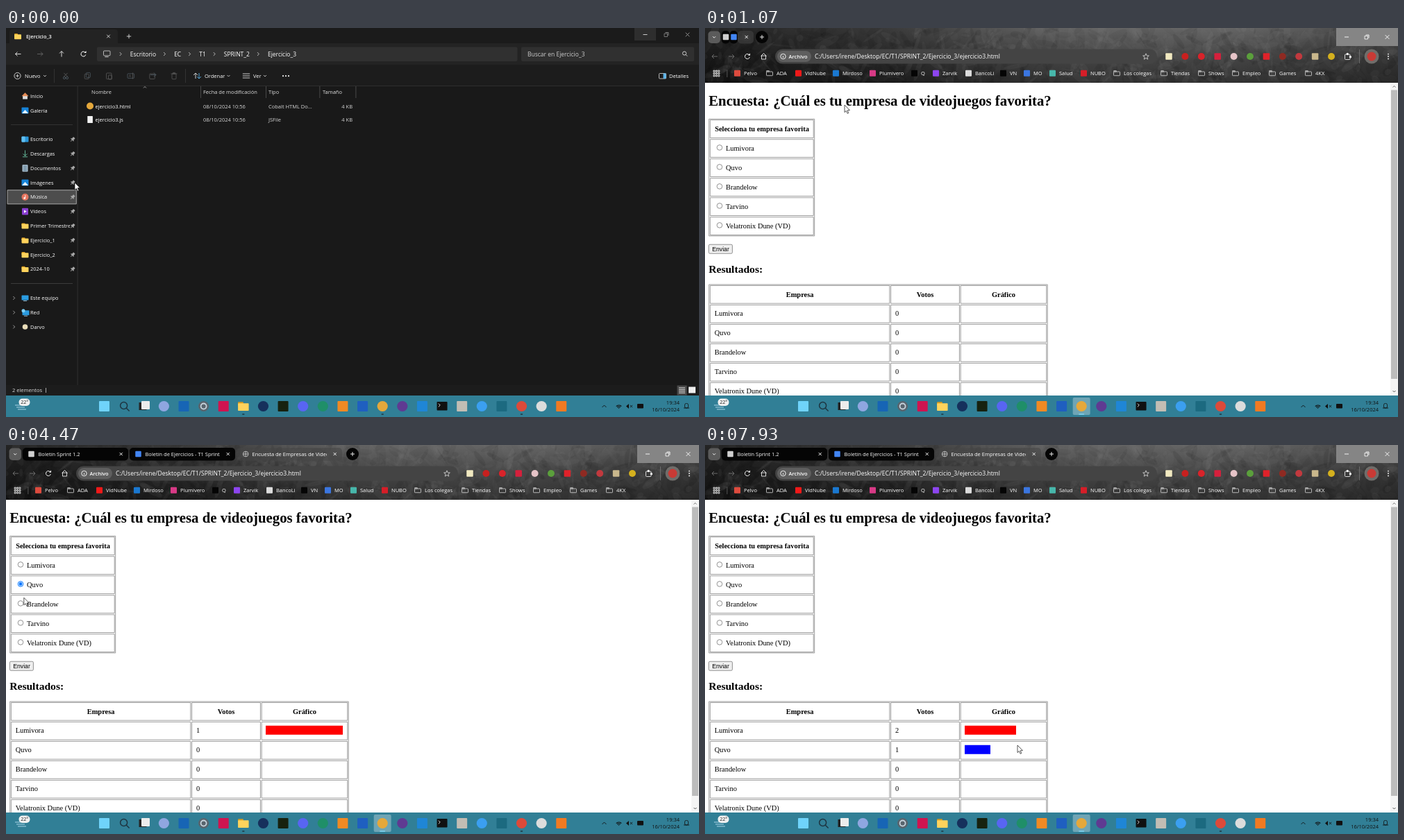
An HTML page with a canvas that plays this animation: 998 px wide and 561 px high, repeating every 8000 ms.

```html
<!DOCTYPE html>
<html lang="es">
<head>
<meta charset="utf-8">
<title>Encuesta</title>
<style>
html, body { margin: 0; width: 100%; height: 100%; overflow: hidden; background: #191919; }
canvas { display: block; width: 100vw; height: 100vh; }
</style>
</head>
<body>
<canvas id="stage"></canvas>
<script>
const W = 998, H = 561, LOOP = 8000, STEP = 1000 / 15;
const SANS = '"Open Sans", "Noto Sans", sans-serif';
const SERIF = '"Liberation Serif", serif';
const ARIAL = '"Liberation Sans", sans-serif';
const canvas = document.getElementById('stage');
const ratio = Math.max(1, window.devicePixelRatio || 1);
canvas.width = W * ratio;
canvas.height = H * ratio;
let g = canvas.getContext('2d');

const clamp = v => Math.min(1, Math.max(0, v));
const smooth = p => p * p * (3 - 2 * p);
const easeOut = p => 1 - (1 - p) ** 2;
const mix = (a, b, p) => a + (b - a) * p;

// Drawing helpers
function box(x, y, w, h, fill, r = 0) {
  g.fillStyle = fill;
  g.beginPath();
  g.roundRect(x, y, w, h, r);
  g.fill();
}
function frame(x, y, w, h, color, r = 0, lw = 0.8) {
  g.strokeStyle = color;
  g.lineWidth = lw;
  g.beginPath();
  g.roundRect(x, y, w, h, r);
  g.stroke();
}
function dot(x, y, r, fill) {
  g.fillStyle = fill;
  g.beginPath();
  g.arc(x, y, r, 0, 7);
  g.fill();
}
function ring(x, y, r, color, lw = 0.9, from = 0, to = 7) {
  g.strokeStyle = color;
  g.lineWidth = lw;
  g.beginPath();
  g.arc(x, y, r, from, to);
  g.stroke();
}
function trace(x, y, pts) {
  g.beginPath();
  for (let i = 0; i < pts.length; i += 2) g.lineTo(x + pts[i], y + pts[i + 1]);
}
function path(x, y, pts, color, lw = 0.9) {
  g.strokeStyle = color;
  g.lineWidth = lw;
  trace(x, y, pts);
  g.stroke();
}
function poly(x, y, pts, fill) {
  g.fillStyle = fill;
  trace(x, y, pts);
  g.fill();
}
// y is the vertical middle of the capitals
function text(s, x, y, size = 7.5, color = '#fff', align = 'left', font = SANS, weight = 400) {
  g.font = `${weight} ${size}px ${font}`;
  g.fillStyle = color;
  g.textAlign = align;
  g.fillText(s, x, y + size * 0.36);
}
function clipped(x, y, w, h, draw) {
  g.save();
  g.beginPath();
  g.rect(x, y, w, h);
  g.clip();
  draw();
  g.restore();
}
const square = (x, y, s, fill) => box(x - s / 2, y - s / 2, s, s, fill, 1);
const hline = (x, y, s, c) => path(x, y, [-s, 0, s, 0], c);
const vline = (x, y, s, c) => path(x, y, [0, -s, 0, s], c);
const plus = (x, y, s, c) => { hline(x, y, s, c); vline(x, y, s, c); };
const cross = (x, y, s, c) => {
  path(x, y, [-s, -s, s, s], c);
  path(x, y, [-s, s, s, -s], c);
};
const chevron = (x, y, c = '#ccc', s = 1) => path(x, y, [-2 * s, -s, 0, s, 2 * s, -s], c);
const chevronRight = (x, y, c = '#ccc') => path(x, y, [-1.2, -2.4, 1.2, 0, -1.2, 2.4], c);
function arrow(x, y, turn, c) {
  g.save();
  g.translate(x, y);
  g.rotate(turn * Math.PI / 2);
  hline(0, 0, 4, c);
  path(4, 0, [-3, -3, 0, 0, -3, 3], c);
  g.restore();
}
function reload(x, y) {
  ring(x, y, 3.4, '#fff', 1, 0.3, 5.7);
  poly(x + 4, y - 1.4, [-3, 0, 0, 0, 0, -3], '#fff');
}
function magnifier(x, y, r, c, lw = 0.9) {
  ring(x, y, r, c, lw);
  path(x + r * 0.7, y + r * 0.7, [0, 0, r * 0.9, r * 0.9], c, lw);
}
function restore(x, y, c) {
  frame(x - 3, y - 1.5, 4.5, 4.5, c);
  path(x, y, [-1.5, -3, 3, -3, 3, 1.5], c);
}
function folder(x, y, s = 1) {
  box(x - 5 * s, y - 4 * s, 5 * s, 4 * s, '#d99a1c', 0.8);
  box(x - 5 * s, y - 2.8 * s, 10 * s, 7 * s, '#ffd35c', 0.8);
}
function folderLine(x, y) {
  frame(x - 4.5, y - 2, 9, 5.7, '#d5d5d5', 0.8);
  frame(x - 4.5, y - 3.4, 4, 1.4, '#d5d5d5', 0.4);
}
function pin(x, y) {
  g.save();
  g.translate(x, y);
  g.rotate(0.78);
  box(-1.7, -3.4, 3.4, 4, '#a8a8a8', 0.5);
  box(-2.8, 0, 5.6, 1.3, '#a8a8a8');
  box(-0.4, 1, 0.8, 3, '#a8a8a8');
  g.restore();
}
function screen(x, y) {
  box(x - 5, y - 4, 10, 7, '#2a9be0', 0.7);
  box(x - 2.5, y + 3.6, 5, 0.9, '#a8c9dd');
}

// Sidebar glyphs
const glyphs = {
  folder, screen,
  home(x, y) {
    box(x - 3.4, y - 1, 6.8, 5.4, '#dcdcdc');
    poly(x, y, [-5, 0, 0, -5, 5, 0], '#e58b55');
  },
  picture(x, y) {
    box(x - 5, y - 4.5, 10, 9, '#1683d8', 1);
    poly(x, y + 4, [-4.5, 0, 0, -5, 4.5, 0], '#e4f3ff');
  },
  desk(x, y) { box(x - 5, y - 4, 10, 8, '#2994d6', 1); box(x - 5, y - 4, 5, 8, '#62bff0', 1); },
  down(x, y) { arrow(x, y - 1, 1, '#6ac6a4'); hline(x, y + 4.4, 3.6, '#6ac6a4'); },
  doc(x, y) {
    box(x - 4, y - 5, 8, 10, '#a9bfd0', 0.8);
    for (let i = 0; i < 4; i++) box(x - 2.5, y - 3 + i * 2, 5, 0.8, '#48697f');
  },
  music(x, y) { dot(x, y, 5, '#e6755f'); dot(x - 0.8, y + 1.6, 1.3, '#fff'); vline(x + 0.3, y - 0.6, 2.2, '#fff'); },
  video(x, y) { box(x - 4.5, y - 4.8, 9, 9.6, '#8a3fd1', 1); poly(x, y, [-1.5, -2.2, 2.2, 0, -1.5, 2.2], '#fff'); },
  net(x, y) { screen(x + 1, y + 1); dot(x - 2.5, y - 2.5, 2.5, '#7fd0f5'); },
  plain(x, y) { dot(x, y, 3.8, '#e8dcb8'); }
};
const sidebar = [
  'home Inicio', 'picture Galería', '',
  'desk Escritorio', 'down Descargas', 'doc Documentos', 'picture Imágenes', 'music Música', 'video Vídeos',
  'folder Primer Trimestre', 'folder Ejercicio_1', 'folder Ejercicio_2', 'folder 2024-10', '',
  'screen Este equipo', 'net Red', 'plain Darvo'
];

// Timeline
const PICK = 300, LIT = 730, LAUNCH = 870, OPEN = 1050;
const FILE = [201, 111], FIRST = [20, 172], SECOND = [19, 199], SEND = [33, 318];
// start, end and goal of each hand movement
const moves = [
  [60, 300, FILE], [1150, 1540, FIRST], [2050, 2470, SEND], [2850, 3270, [400, 403]], [3620, 4130, SECOND],
  [4270, 4670, SEND], [4960, 5460, [438, 444]], [5760, 6200, FIRST], [6700, 7130, SEND], [7530, 7930, [450, 433]]
];
// option chosen and moment of sending for each round
const rounds = [
  { option: 0, pick: 1850, send: 2700 },
  { option: 1, pick: 4240, send: 4930 },
  { option: 0, pick: 6450, send: 7350 }
];

function cursorAt(t) {
  let at = [99, 223];
  for (const [from, to, goal] of moves) {
    const s = smooth(clamp((t - from) / (to - from)));
    at = [mix(at[0], goal[0], s), mix(at[1], goal[1], s ** 2.4)];
  }
  return at;
}

function commandIcons(on) {
  const a = on ? '#e4e4e4' : '#5a5a5a', b = on ? '#5cb3e8' : '#4f5a62', off = '#5a5a5a';
  cross(86, 67.5, 2.6, a);
  ring(84, 72, 1.6, b);
  ring(88, 72, 1.6, b);
  frame(113.2, 66.4, 6, 7, a, 1);
  frame(115.4, 64.4, 6, 7, b, 1);
  frame(144.5, 65, 7.5, 8.6, off, 1);
  frame(147.5, 68, 5, 6, off, 1);
  frame(175, 65.8, 9.6, 6.6, b, 1);
  text('A', 176.8, 69, 5.5, a);
  vline(182.6, 69, 4.5, a);
  frame(206.8, 66, 7.5, 7.5, a, 1);
  arrow(212, 67.5, 0, b);
  hline(242, 66, 4.4, a);
  frame(239, 66, 6, 7.7, a, 1);
  frame(240.5, 64.4, 3, 1.6, a);
}

function explorer(t) {
  const picked = t >= PICK;
  box(0, 0, W, 530, '#191919');
  box(0, 0, W, 23, '#1b1b1b');
  box(5, 2, 156, 24, '#232323', 4);
  box(0, 22, W, 31.5, '#232323');
  folder(17, 12);
  text('Ejercicio_3', 29, 12, 7.4, '#fff', 'left', SANS, 600);
  cross(147.5, 12, 2.3, '#ddd');
  plus(177, 12, 3.2, '#ddd');
  box(905, 0, 31, 18, '#2e2e2e');
  hline(920.5, 9.5, 3, '#ddd');
  restore(951, 9.5, '#8c8c8c');
  cross(981.5, 9.5, 2.8, '#999');

  arrow(17.5, 37.5, 2, '#eee');
  arrow(49, 37.5, 0, '#666');
  arrow(80, 37.5, 3, '#eee');
  reload(111.5, 37.5);
  box(131, 27.5, 605.5, 20.5, '#303030', 2);
  box(742, 27.5, 249, 20.5, '#303030', 2);
  frame(140.5, 33, 9.5, 6.8, '#ddd', 1);
  hline(145, 41.6, 2.6, '#ddd');
  let x = 165;
  for (const s of ['Escritorio', 'EC', 'T1', 'SPRINT_2', 'Ejercicio_3']) {
    chevronRight(x, 37.5);
    text(s, x + 13.8, 37.5, 8.5);
    x += g.measureText(s).width + 26;
  }
  text('Buscar en Ejercicio_3', 751, 37.5, 8.5, '#cfcfcf');
  magnifier(977, 36.5, 2.6, '#ddd');

  box(0, 53.5, W, 30, '#1c1c1c');
  box(0, 83, W, 0.8, '#353535');
  ring(16.5, 69, 4.6, '#ddd');
  plus(16.5, 69, 2.3, '#ddd');
  text('Nuevo', 27, 69);
  text('Ordenar', 286, 69);
  text('Ver', 356, 69);
  for (const cx of [56, 320.5, 373]) chevron(cx, 69);
  for (const sx of [69, 258]) box(sx, 59, 0.8, 20, '#3a3a3a');
  commandIcons(t >= LIT);
  arrow(273, 69, 3, '#ddd');
  arrow(278, 69, 1, '#5cb3e8');
  for (let i = -1; i < 2; i++) {
    hline(346, 69 + i * 3, 5.2, '#ddd');
    dot(403 + i * 4, 69.2, 1.1, '#eee');
  }
  frame(940.5, 65.5, 10, 7.5, '#ddd', 1);
  box(946.5, 65.5, 4, 7.5, '#5cb3e8');
  text('Detalles', 955, 69);

  box(102.7, 84, 0.8, 431, '#363636');
  for (const [s, left, edge] of [['Nombre', 123, 280], ['Fecha de modificación', 284, 374], ['Tipo', 378, 451.5], ['Tamaño', 456, 503.5]]) {
    text(s, left, 92.2, 7.5, '#dedede');
    box(edge, 84, 0.8, 17, '#555');
  }
  chevron(200, 85.5, '#aaa', -1);
  if (t >= 200) box(106, 103.5, 396, 18.5, picked ? '#4a4a4a' : '#303030', 2);
  dot(121, 112.5, 5, '#e5a83b');
  box(117.3, 127, 7.6, 10, '#f2f2f2', 0.6);
  [['ejercicio3.html', 'Cobalt HTML Do...'], ['ejercicio3.js', 'JSFile']].forEach(([name, kind], i) => {
    const y = 113 + i * 19;
    text(name, 128.5, y);
    text('08/10/2024 10:56', 284, y, 7.5, '#d5d5d5');
    text(kind, 378, y, 7.5, '#d5d5d5');
    text('4 KB', 499, y, 7.5, '#d5d5d5', 'right');
  });

  box(2, 233.5, 99.5, 20.5, picked ? '#353535' : '#4d4d4d', 1);
  if (!picked) frame(2, 233.8, 99.3, 20, '#bdbdbd');
  sidebar.forEach((entry, i) => {
    const y = 98.2 + i * 20.8, pinned = i > 2 && i < 13;
    if (!entry) return box(7, y - 0.5, 89, 0.8, '#3b3b3b');
    const [icon, ...words] = entry.split(' ');
    glyphs[icon](27.5, y);
    clipped(0, y - 9, pinned ? 92 : 102, 18, () => text(words.join(' '), 35, y, 7.4));
    if (pinned) pin(96, y);
    if (i > 13) chevronRight(11.5, y, '#aaa');
  });

  box(0, 515, W, 15, '#1c1c1c');
  text('2 elementos', 9, 522.5, 7.5, '#dedede');
  box(57, 519, 0.8, 7, '#ccc');
  if (picked) text('1 elemento seleccionado  3,12 KB', 64, 522.5, 7.5, '#dedede');
  box(966.5, 515.5, 14, 14, '#4a4a4a');
  for (let i = 0; i < 4; i++) box(969, 518.5 + i * 2.4, 9, 0.9, '#eee');
  box(983, 517.5, 10, 9, '#eee');
}

// Stone-like browser theme, painted once
function paintTheme() {
  const layer = document.createElement('canvas'), main = g;
  layer.width = W;
  layer.height = 79;
  g = layer.getContext('2d');
  const fade = (x, y, ...stops) => {
    const f = g.createLinearGradient(0, 0, x, y);
    stops.forEach((c, i) => f.addColorStop(i / (stops.length - 1), c));
    box(0, 0, W, 79, f);
  };
  fade(W, 0, '#242424', '#383838', '#626262', '#666', '#4c4c4c');
  fade(0, 79, 'rgba(0,0,0,0)', 'rgba(0,0,0,.3)', 'rgba(0,0,0,.5)');
  let seed = 7;
  const rnd = () => (seed = seed * 16807 % 2147483647) / 2147483647;
  for (let i = 0; i < 900; i++) {
    const v = rnd() < 0.5 ? 0 : 160;
    g.fillStyle = `rgba(${v},${v},${v},${0.02 + rnd() * 0.06})`;
    g.beginPath();
    g.ellipse(rnd() * W, rnd() * 79, 3 + rnd() * 16, 1 + rnd() * 5, rnd() * 3, 0, 7);
    g.fill();
  }
  g = main;
  return layer;
}
const theme = paintTheme();

function globe(x, y) {
  ring(x, y, 3.8, '#c4c4c4');
  hline(x, y, 3.8, '#c4c4c4');
  vline(x, y, 3.8, '#c4c4c4');
}

function tabs(t) {
  const p = easeOut(clamp((t - 1090) / 210));
  const labels = ['Boletín Sprint 1.2', 'Boletín de Ejercicios - T1 Sprint', 'Encuesta de Empresas de Videojuegos'];
  const icons = ['#cfcfcf', '#4285f4'];
  box(4.5, 4.5, 17.5, 17.5, '#5b5b5b', 5);
  chevron(13.2, 13.2, '#fff');
  labels.forEach((label, i) => {
    const last = i === 2, l = 24 + i * mix(11.5, 154, p), w = mix(last ? 23 : 11.5, 152, p), wide = w > 60;
    box(l, 4, w, 18.5, last ? 'rgba(70,70,70,.55)' : '#050505', 5);
    if (!last) square(l + (wide ? 12.5 : 6), 13, 8.5, icons[i]);
    else if (wide) globe(l + 13.2, 13);
    if (wide) clipped(l + 21, 4, w - 43, 19, () => text(label, l + 22.5, 13.2));
    if (wide || last) cross(l + w - 10.3, 13, 2.1, '#fff');
  });
  const px = mix(82, 499, p);
  dot(px, 13, 9, '#050505');
  plus(px, 13, 3, '#fff');
}

const extensions = ['#f1e9c0', '#c8201f', '#d9232a', '#d6203c', '#e6c4c8', '#5b9f3c', '#e0222a', '#8f2a22', '#c2393e', '#c9b78c', '#d4b01e'];
// label, its left edge, icon colour (a folder when missing)
const bookmarks = [
  ['Pelvo', 56, '#dd4b3e'], ['ADA', 103], ['VidNube', 144, '#f01919'], ['Mirdoso', 198, '#1a78d0'],
  ['Plumivero', 251, '#d83a86'], ['Q', 311, '#050505'], ['Zarvik', 342, '#8d45f0'], ['BancoLi', 389, '#dcdcdc'],
  ['VN', 439, '#050505'], ['MO', 473, '#3b76e0'], ['Salud', 510, '#47b7ab'], ['NUBO', 555, '#d61e28'],
  ['Los colegas', 603], ['Tiendas', 671], ['Shows', 725], ['Empleo', 774], ['Games', 827], ['4KX', 879]
];

function star(x, y) {
  const pts = [];
  for (let i = 0; i <= 10; i++) {
    const r = i % 2 ? 2 : 4.6, a = i * Math.PI / 5;
    pts.push(r * Math.sin(a), -r * Math.cos(a));
  }
  path(x, y, pts, '#ddd', 0.8);
}

function browserBar(t) {
  g.drawImage(theme, 0, 0);
  tabs(t);
  box(909, 0, 89, 26, '#858585');
  hline(924, 13, 3, '#fff');
  restore(953, 13, '#fff');
  cross(982.5, 13, 2.9, '#fff');

  arrow(14, 41, 2, '#777');
  arrow(38, 41, 0, '#777');
  reload(61, 41);
  frame(81.5, 40, 6, 5, '#fff');
  chevron(84.5, 38.5, '#fff', -2);
  box(101, 30.5, 550, 21, '#444', 10.5);
  box(104, 33, 49, 16, '#5f5f5f', 8);
  ring(112.5, 41, 3.7, '#fff');
  vline(112.5, 41.6, 1.4, '#fff');
  text('Archivo', 120.5, 41.2, 7.5, '#fff', 'left', SANS, 600);
  text('C:/Users/irene/Desktop/EC/T1/SPRINT_2/Ejercicio_3/ejercicio3.html', 158, 41.2, 8.6);
  star(635, 41.4);
  extensions.forEach((c, i) => {
    const x = 668 + i * 23.4;
    i % 3 ? dot(x, 41, 5, c) : square(x, 41, 9.5, c);
  });
  frame(921.5, 38, 7.5, 7.5, '#fff', 1);
  dot(925.2, 37.4, 1.6, '#fff');
  dot(929.4, 41.7, 1.6, '#fff');
  box(942, 31, 0.8, 20, '#777');
  dot(960, 41, 10.5, '#6f6d6a');
  dot(960, 41, 6.5, '#c93a35');
  for (let i = -1; i < 2; i++) dot(984, 41 + i * 3.4, 0.9, '#fff');

  for (let i = 0; i < 9; i++) frame(12.2 + i % 3 * 3.4, 61.2 + Math.floor(i / 3) * 3.4, 1.9, 1.9, '#fff');
  box(31.5, 60, 0.8, 11, '#666');
  for (const [label, x, color] of bookmarks) {
    if (color) square(x - 9.5, 65.3, 9, color);
    else folderLine(x - 10, 65);
    text(label, x, 65.3);
  }
}

const firms = ['Lumivora', 'Quvo', 'Brandelow', 'Tarvino', 'Velatronix Dune (VD)'];
const BLACK = '#000', LINE = '#858585', ROW = 28;
const serif = (s, x, y, size = 10.4, align = 'left', weight = 400) => text(s, x, y, size, BLACK, align, SERIF, weight);
const heading = (s, x, y) => serif(s, x, y, 10.4, 'center', 700);

function page(t, [cx, cy]) {
  box(0, 78.5, W, 451.5, '#fff');
  serif('Encuesta: ¿Cuál es tu empresa de videojuegos favorita?', 5.2, 104.8, 20.8, 'left', 700);
  const votes = firms.map((_, i) => rounds.filter(r => r.option === i && t >= r.send).length);
  const total = votes.reduce((a, b) => a + b);
  const open = rounds.find(r => t >= r.pick && t < r.send);

  frame(5.7, 131.3, 152, 168.6, LINE);
  for (let i = 0; i < 6; i++) frame(7.4, 132.7 + i * ROW, 148.8, 25.8, LINE);
  heading('Selecciona tu empresa favorita', 82, 145.6);
  firms.forEach((name, i) => {
    const y = 172.4 + i * ROW, on = open && open.option === i;
    ring(21, y, 3.8, on ? '#0075ff' : '#767676', on ? 1 : 0.8);
    if (on) dot(21, y, 2.4, '#0075ff');
    serif(name, 30, y + 1.2);
  });

  const over = cx >= 5 && cx <= 40 && cy >= 311 && cy <= 326;
  box(5.4, 312.2, 34, 13, over ? '#e2e2e2' : '#efefef', 1.6);
  frame(5.4, 312.2, 34, 13, over ? '#4f4f4f' : '#767676', 1.6);
  text('Enviar', 22.5, 318.8, 8.7, BLACK, 'center', ARIAL);
  serif('Resultados:', 5.2, 347.7, 15.6, 'left', 700);

  clipped(0, 79, 987, 451, () => {
    frame(5.7, 370, 487.5, 170, LINE);
    for (const [s, x, w] of [['Empresa', 7.4, 258.4], ['Votos', 267.6, 98.8], ['Gráfico', 368.2, 123.6]]) {
      for (let i = 0; i < 6; i++) frame(x, 371.4 + i * ROW, w, 25.8, LINE);
      heading(s, x + w / 2, 384);
    }
    firms.forEach((name, i) => {
      const y = 411.5 + i * ROW;
      serif(name, 13.7, y);
      serif(votes[i], 274, y);
      if (votes[i]) box(374, y - 6.8, 111 * votes[i] / total, 13, i ? '#00f' : '#f00');
    });
  });
  box(987, 78.5, 11, 451.5, '#f4f4f4');
  box(988, 89.5, 9, 416.5, '#bcbcbc');
  chevron(992.5, 84.5, '#606060', -1);
  chevron(992.5, 524, '#404040');
}

// Taskbar buttons share one pitch; '' marks those drawn by hand
const apps = [
  '#6fd3fa', '', '', '#8fa6e0', '#1765b5', '#59656e', '#cf1450', '', '#16305c', '#17220f', '#5865f2', '#1f8f68',
  '#f08a24', '#1f5fc0', '#e5a83b', '#5f3a92', '#1f86d6', '', '#c2bdb4', '#3b9ff0', '#1c6a80', '#dc4a3a', '#dcdcdc', '#f07a22'
];
const appX = i => 141.5 + i * 28.62;
const ROUND = [3, 5, 8, 10, 11, 14, 15, 19, 21, 22], FOLDERS = 7, BROWSER = 14, SECOND_BROWSER = 21;

function taskbar(t) {
  box(0, 530, W, 31, '#317f96');
  const active = { [FOLDERS]: t >= PICK && t < OPEN, [BROWSER]: t >= LAUNCH };
  for (const i of [FOLDERS, BROWSER, SECOND_BROWSER]) {
    const on = active[i], w = on ? 8 : 3.5;
    if (on) box(appX(i) - 12.5, 533, 25, 25, 'rgba(255,255,255,.3)', 2);
    box(appX(i) - w / 2, 556.3, w, 1.5, on ? '#7fd4f5' : '#20343d', 0.7);
  }
  apps.forEach((c, i) => {
    if (!c) return;
    if (ROUND.includes(i)) dot(appX(i), 545.5, 7.6, c);
    else square(appX(i), 545.5, 15, c);
  });
  magnifier(appX(1) - 0.5, 544.5, 5, '#1e3440', 1.5);
  box(191.5, 540, 11, 11, '#222');
  box(195, 538, 12, 12, '#ececec', 1);
  ring(appX(5), 545.5, 4, '#c6d3dc', 1.8);
  folder(appX(FOLDERS), 545.5, 1.55);
  box(appX(17) - 7.5, 539, 15, 12.5, '#101010', 0.8);
  chevronRight(appX(17) - 4, 544, '#eee');

  for (let i = 0; i < 3; i++) box(13 + i * 2, 543.5 + i * 3, 12, 0.9, '#b9dff0');
  box(18.5, 534.5, 16, 10.5, '#f1f1f1', 5);
  text('22°', 26.7, 539.8, 7, '#222', 'center');

  const ink = '#111';
  chevron(861.5, 545.5, ink, -1.5);
  for (let r = 1; r < 7; r += 2) ring(882.5, 549, r, ink, 1.2, -2.4, -0.75);
  poly(895, 545.5, [-2, 0, 2, -3.4, 2, 3.4], ink);
  cross(900.5, 545.5, 1.6, ink);
  box(909, 542, 9, 6.5, ink, 1);
  text('19:34', 970, 540.3, 7.5, ink, 'right');
  text('16/10/2024', 970, 550.5, 7.5, ink, 'right');
  frame(977.5, 541.5, 5, 6.5, ink, 2);
  hline(980, 548, 4, ink);
}

function pointer(x, y) {
  const shape = [0, 0, 0, 10.6, 2.4, 8.4, 4.1, 12.3, 5.8, 11.5, 4.1, 7.8, 7.4, 7.6, 0, 0];
  poly(x, y, shape, '#fff');
  path(x, y, shape, '#111', 0.7);
}

function render(t) {
  g.setTransform(ratio, 0, 0, ratio, 0, 0);
  const at = cursorAt(t);
  if (t < OPEN) {
    explorer(t);
    taskbar(t);
    if (t >= LAUNCH) {
      const p = easeOut(clamp((t - 940) / (OPEN - 940)));
      box(mix(106, 0, p), mix(102, 0, p), mix(800, W, p), mix(425.5, 530, p), '#fff');
    }
  } else {
    page(t, at);
    browserBar(t);
    taskbar(t);
  }
  pointer(...at);
}

const start = performance.now();
function tick() {
  const t = (performance.now() - start) % LOOP;
  render(Math.floor((t + 5) / STEP) * STEP);
  requestAnimationFrame(tick);
}
tick();
</script>
</body>
</html>
```
